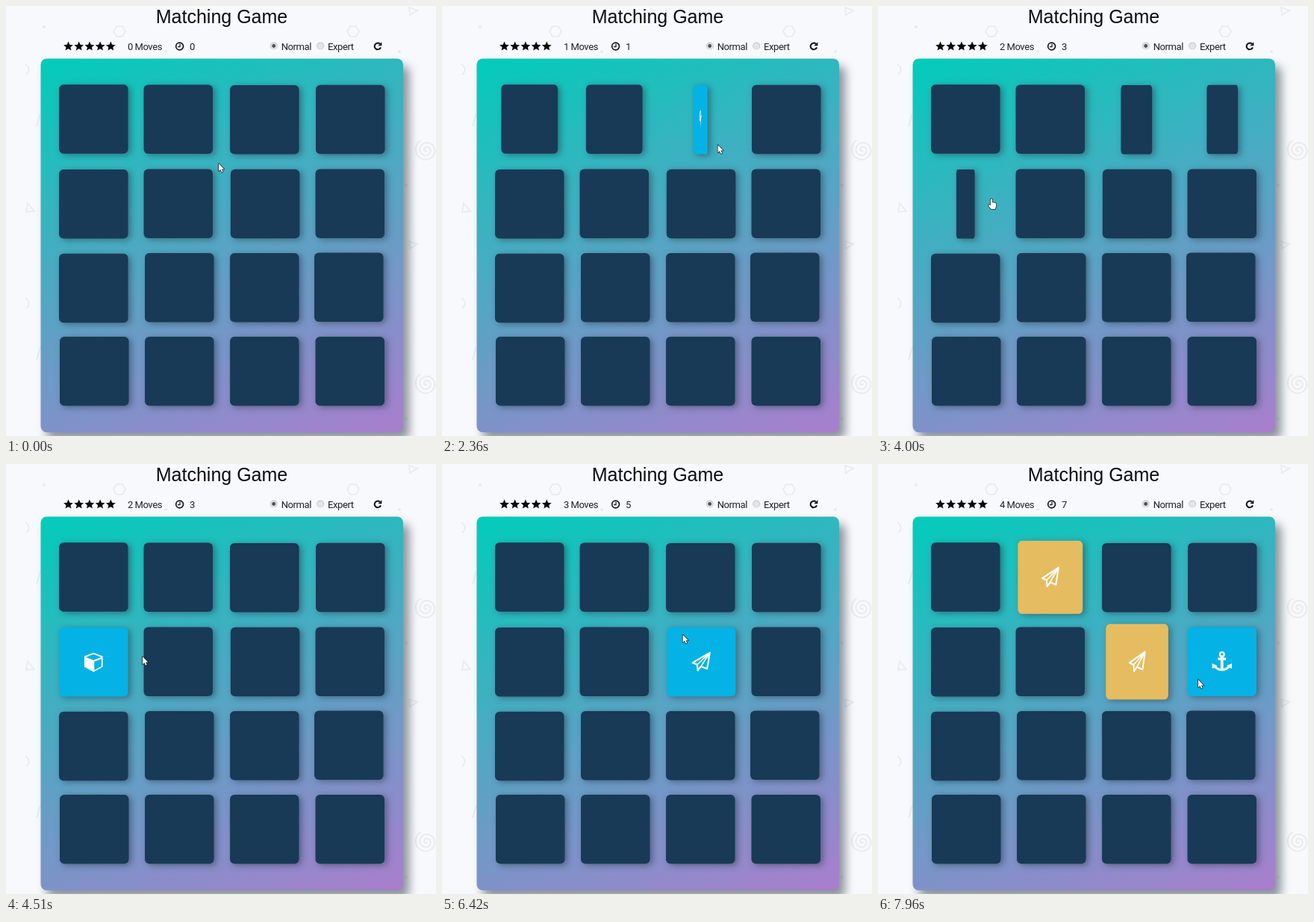
Write an HTML page with a canvas that moves like this. It is 576 by 576 pixels and loops after 8 s.

```html
<!DOCTYPE html>
<html lang="en">
<head>
<meta charset="utf-8">
<title>Matching Game</title>
<style>
html, body { margin: 0; width: 100%; height: 100%; overflow: hidden; background: #f8f9fc; }
canvas { display: block; }
</style>
</head>
<body>
<canvas id="stage" width="576" height="576"></canvas>
<script>
const SIZE = 576, LOOP = 8000, CARD = 92.5;
const DARK = '#183a56', BLUE = '#05b2e5', GOLD = '#e5bc60';
const ctx = document.getElementById('stage').getContext('2d');

// Left and top edges of the cards, row by row
const LEFT = [71, 184.5, 300, 415, 71, 184.5, 300.8, 414.5, 71, 186, 300, 413, 72, 186, 300, 414.5];
const TOP = [105.3, 105.5, 106, 105.7, 219, 218.5, 218.7, 218.5, 331.8, 331, 331, 330.5, 443, 443, 443, 443];
const FACES = ['anchor', 'plane', 'bolt', 'leaf', 'cube', 'diamond', 'plane', 'anchor'];

// Turns: card, start time
const TURN = 400;
const TURNS = [[0, 830], [1, 1070], [0, 2160], [1, 2160], [2, 2230], [3, 2986],
  [2, 3850], [3, 3850], [4, 3900], [5, 4830], [4, 5796], [5, 5796],
  [6, 5900], [1, 7136], [7, 7570]];
const MATCH = 7080;
const BOUNCE = { 1: 7533, 6: 7537 };
const RUBBER = [[0, 1, 1], [300, 1.25, .75], [400, .75, 1.25], [500, 1.15, .85]];
const MOVES = [1160, 2850, 4800, 7050];
const CLICKS = [790, 1040, 2190, 2850, 3860, 4790, 5830, 7050, 7530];

// Pointer stops: time, x, y
const STOPS = [[300, 285, 211], [380, 283, 215], [780, 140, 165], [860, 140, 165],
  [1030, 235, 168], [1130, 238, 172], [1380, 291, 207], [1700, 357, 190], [1920, 357, 188],
  [2250, 356, 187], [2720, 452, 181], [2950, 454, 185], [3250, 355, 243], [3720, 157, 256],
  [4000, 152, 258], [4510, 183, 258], [4590, 184, 258], [4760, 215, 262], [4900, 225, 264],
  [5380, 336, 276], [5480, 336, 276], [5530, 343, 281], [5760, 343, 281], [5830, 352, 271],
  [5960, 352, 271], [6520, 320, 225], [6570, 320, 225], [7000, 250, 165], [7090, 250, 165],
  [7300, 417, 247], [7480, 440, 262], [7620, 440, 262], [7960, 429, 289]];

const clamp = v => Math.max(0, Math.min(1, v));
const mix = (a, b, k) => a + (b - a) * k;
const smooth = k => k * k * (3 - 2 * k);

// cubic-bezier(.25, .1, .25, 1)
function ease(x) {
  if (x <= 0 || x >= 1) return clamp(x);
  const curve = (a, b, s) => 3 * a * s * (1 - s) ** 2 + 3 * b * s * s * (1 - s) + s ** 3;
  let lo = 0, hi = 1;
  for (let i = 0; i < 18; i++) {
    const mid = (lo + hi) / 2;
    if (curve(.25, .25, mid) < x) lo = mid; else hi = mid;
  }
  return curve(.1, 1, lo);
}

function between(keys, t, easing) {
  if (t <= keys[0][0]) return keys[0].slice(1);
  for (let i = 1; i < keys.length; i++) {
    const a = keys[i - 1], b = keys[i];
    if (t < b[0]) {
      const k = easing((t - a[0]) / (b[0] - a[0]));
      return [mix(a[1], b[1], k), mix(a[2], b[2], k)];
    }
  }
  return keys[keys.length - 1].slice(1);
}

function stroke(c, path, color, width) {
  c.strokeStyle = color;
  c.lineWidth = width;
  c.stroke(new Path2D(path));
}

function fill(c, path, color, rule = 'nonzero') {
  c.fillStyle = color;
  c.fill(new Path2D(path), rule);
}

function disc(c, x, y, r, color) {
  c.fillStyle = color;
  c.beginPath();
  c.arc(x, y, r, 0, 7);
  c.fill();
}

function shadow(c, color, x, y, blur) {
  c.shadowColor = color;
  c.shadowOffsetX = x;
  c.shadowOffsetY = y;
  c.shadowBlur = blur;
}

function box(c, x, y, w, h, r) {
  c.beginPath();
  c.roundRect(x, y, w, h, r);
  c.fill();
}

function label(c, text, x, y, align = 'left') {
  c.font = '13px Roboto, sans-serif';
  c.letterSpacing = '-0.4px';
  c.textAlign = align;
  c.fillStyle = '#1c2026';
  c.fillText(text, x, y);
}

function polygon(x, y, n, r, turn) {
  let d = '';
  for (let i = 0; i < n; i++) {
    const a = turn + i * 2 * Math.PI / n;
    d += (i ? 'L' : 'M') + (x + r * Math.cos(a)) + ' ' + (y + r * Math.sin(a));
  }
  return d + 'Z';
}

function star(x, y, r) {
  let d = '';
  for (let i = 0; i < 10; i++) {
    const a = i * Math.PI / 5 - Math.PI / 2, q = i % 2 ? r * .46 : r;
    d += (i ? 'L' : 'M') + (x + q * Math.cos(a)) + ' ' + (y + q * Math.sin(a));
  }
  return d + 'Z';
}

function spiral(x, y) {
  let d = `M${x} ${y}`;
  for (let a = 0; a < 17; a += .25) {
    const r = a * .9;
    d += `L${x + r * Math.cos(a)} ${y + r * Math.sin(a)}`;
  }
  return d;
}

function drawPattern(c) {
  const ink = '#e9ebef';
  for (const y of [0, 313]) {
    stroke(c, spiral(563, 193 + y), ink, 2);
    stroke(c, `M540 ${2 + y}L551 ${6 + y}L541 ${12 + y}Z`, ink, 1.8);
    stroke(c, `M26 ${78 + y}Q35 ${85 + y} 27 ${92 + y}`, ink, 1.8);
    stroke(c, `M46 ${144 + y}L41 ${161 + y}`, ink, 1.8);
    disc(c, 536, 240 + y, 2, ink);
  }
  stroke(c, 'M29 264L38 275L27 276Z', ink, 1.8);
  for (const x of [0, 313]) {
    stroke(c, polygon(152 + x, 34, 6, 8, 0), ink, 1.8);
    disc(c, 214 + x, 61, 2, ink);
  }
  disc(c, 51, 28, 2, ink);
}

function drawBoard(c) {
  const x = 46.5, y = 70.5, w = 485.5, h = 500.5;
  const a = 160 * Math.PI / 180, sx = Math.sin(a), sy = -Math.cos(a);
  const half = (w * sx + h * sy) / 2, cx = x + w / 2, cy = y + h / 2;
  const g = c.createLinearGradient(cx - sx * half, cy - sy * half, cx + sx * half, cy + sy * half);
  g.addColorStop(0, '#02ccba');
  g.addColorStop(1, '#aa7ecd');
  c.save();
  shadow(c, 'rgba(46,61,73,.55)', 8, 10, 13);
  c.fillStyle = g;
  box(c, x, y, w, h, 8);
  c.restore();
}

function drawHeader(c) {
  c.font = '25px "Liberation Sans", Arial, sans-serif';
  c.textAlign = 'center';
  c.fillStyle = '#0b0d10';
  c.fillText('Matching Game', 289, 22.5);

  for (let i = 0; i < 5; i++) fill(c, star(83.5 + i * 14.2, 54.2, 6.7), '#08090b');
  label(c, 'Moves', 172.5, 58.5);
  label(c, 'Normal', 368.7, 58.5);
  label(c, 'Expert', 431, 58.5);

  c.lineCap = 'butt';
  stroke(c, 'M237.5 54A4.9 4.9 0 1 1 227.7 54A4.9 4.9 0 1 1 237.5 54Z', '#15181c', 1.7);
  stroke(c, 'M233 50.8V54.6H230', '#15181c', 1.3);
  for (const x of [358.7, 421.2]) {
    disc(c, x, 53.5, 5, '#c3c5c8');
    disc(c, x, 53.8, 4.2, '#e3e4e6');
  }
  disc(c, 358.7, 53.5, 2.4, '#4c4f54');
  stroke(c, 'M500.8 50.7A4.3 4.3 0 1 0 502 55.4', '#0b0d10', 2);
  fill(c, 'M503.3 48.3V53.2H498.4Z', '#0b0d10');
}

const ICONS = {
  anchor(c) {
    c.lineCap = 'butt';
    stroke(c, 'M2.8 -9.8A2.8 2.8 0 1 1 -2.8 -9.8A2.8 2.8 0 1 1 2.8 -9.8Z', '#fff', 2.3);
    stroke(c, 'M0 -7V11', '#fff', 3.7);
    stroke(c, 'M-5.4 -3.6H5.4', '#fff', 3.4);
    stroke(c, 'M-10.5 5Q-7.5 10.8 0 11Q7.5 10.8 10.5 5', '#fff', 3);
    fill(c, 'M-13.3 2.3L-6.3 5.5L-13 9.6ZM13.3 2.3L6.3 5.5L13 9.6Z', '#fff');
  },
  plane(c) {
    stroke(c, 'M11.8 -12.2L-11.3 1.2L-5.2 3.8L-4.4 11.6L-.2 6.2L8 9.4Z', '#fff', 2.1);
    stroke(c, 'M11.8 -12.2L-5.2 3.8M11.8 -12.2L-.2 6.2', '#fff', 1.7);
  },
  bolt(c) {
    fill(c, 'M-3.8 -12H2.6L-.3 -4.8L6.6 -6.2L-2 12.6L.4 .8L-6.4 2.4Z', '#fff');
  },
  leaf(c, face) {
    fill(c, 'M11 -11.3C14.5 -2 11.5 9 0 9C-4 9 -5 7 -7 7L-10 10.4L-12.6 8.2L-9 4.6C-11.5 -3 -4 -6.3 3 -6.7C7 -7 9 -8.2 11 -11.3Z', '#fff');
    stroke(c, 'M-6.5 4Q-2 -1.4 6 -2', face, 1.5);
  },
  cube(c) {
    fill(c, 'M0 -12.6L12.3 -7.8V6.6L0 13.2L-12.3 6.6V-7.8ZM0 -10.4L10.4 -6.5L0 -2.5L-10.4 -6.5ZM1 11L10.6 5.8V-4.3L1 -.6Z', '#fff', 'evenodd');
  },
  diamond(c) {
    stroke(c, 'M-7.2 -11H7.2L12.6 -3.2L0 11.6L-12.6 -3.2ZM-12.6 -3.2H12.6M-7.2 -11L-5.2 -3.2L0 11.6L5.2 -3.2L7.2 -11M-5.2 -3.2L0 -11L5.2 -3.2', '#fff', 1.8);
  }
};

function angle(card, t) {
  let open = 0;
  for (const [id, start] of TURNS) {
    if (id !== card || t < start) continue;
    open = mix(open, 1 - open, ease((t - start) / TURN));
  }
  return open * Math.PI;
}

function drawCard(i, t) {
  const cos = Math.cos(angle(i, t)), open = cos < 0;
  let sx = Math.max(.01, Math.abs(cos)), sy = 1;
  if (BOUNCE[i] && t > BOUNCE[i]) {
    const [bx, by] = between(RUBBER, t - BOUNCE[i], ease);
    sx *= bx;
    sy = by;
  }
  const face = !open ? DARK : BOUNCE[i] && t >= MATCH ? GOLD : BLUE;
  ctx.save();
  ctx.translate(LEFT[i] + CARD / 2, TOP[i] + CARD / 2);
  ctx.scale(sx, sy);
  shadow(ctx, 'rgba(46,61,73,.55)', 3.5, 2, 9);
  ctx.fillStyle = face;
  box(ctx, -CARD / 2, -CARD / 2, CARD, CARD, 6);
  if (open) {
    shadow(ctx, 'transparent', 0, 0, 0);
    ctx.lineJoin = 'round';
    ICONS[FACES[i]](ctx, face);
  }
  ctx.restore();
}

function overClosed(x, y, t) {
  return LEFT.some((l, i) => x >= l && x <= l + CARD && y >= TOP[i] && y <= TOP[i] + CARD
    && angle(i, t) < Math.PI / 2);
}

function drawPointer(t) {
  const [x, y] = between(STOPS, t, smooth);
  if (CLICKS.some(c => t >= c && t < c + 100)) disc(ctx, x, y, 8.5, 'rgba(190,35,40,.65)');
  ctx.save();
  ctx.translate(x, y);
  ctx.lineJoin = 'round';
  const shape = overClosed(x, y, t)
    ? 'M-1.2 1Q0 -.6 1.2 1V5.4L2.4 5L3.6 5.8L5 5.6L6.2 6.8V10L5 14H-.6L-4 9.4Q-4 7.6 -2.4 8.4L-1.2 9.4Z'
    : 'M0 0V10.2L2.4 8L4 11.8L5.6 11.1L4 7.4H7.2Z';
  stroke(ctx, shape, '#1b2228', 1.5);
  fill(ctx, shape, '#fff');
  ctx.restore();
}

const backdrop = document.createElement('canvas');
backdrop.width = backdrop.height = SIZE;

function drawBackdrop() {
  const c = backdrop.getContext('2d');
  c.fillStyle = '#f8f9fc';
  c.fillRect(0, 0, SIZE, SIZE);
  drawPattern(c);
  drawBoard(c);
  drawHeader(c);
}

function draw(now) {
  const t = now % LOOP;
  ctx.drawImage(backdrop, 0, 0);
  label(ctx, MOVES.filter(m => t >= m).length, 166.5, 58.5, 'center');
  label(ctx, Math.max(0, Math.floor((t - 800) / 1000)), 249.5, 58.5, 'center');
  for (let i = 0; i < 16; i++) drawCard(i, t);
  drawPointer(t);
}

drawBackdrop();
const begin = performance.now();
function tick() {
  draw(performance.now() - begin);
  requestAnimationFrame(tick);
}
tick();
</script>
</body>
</html>
```
